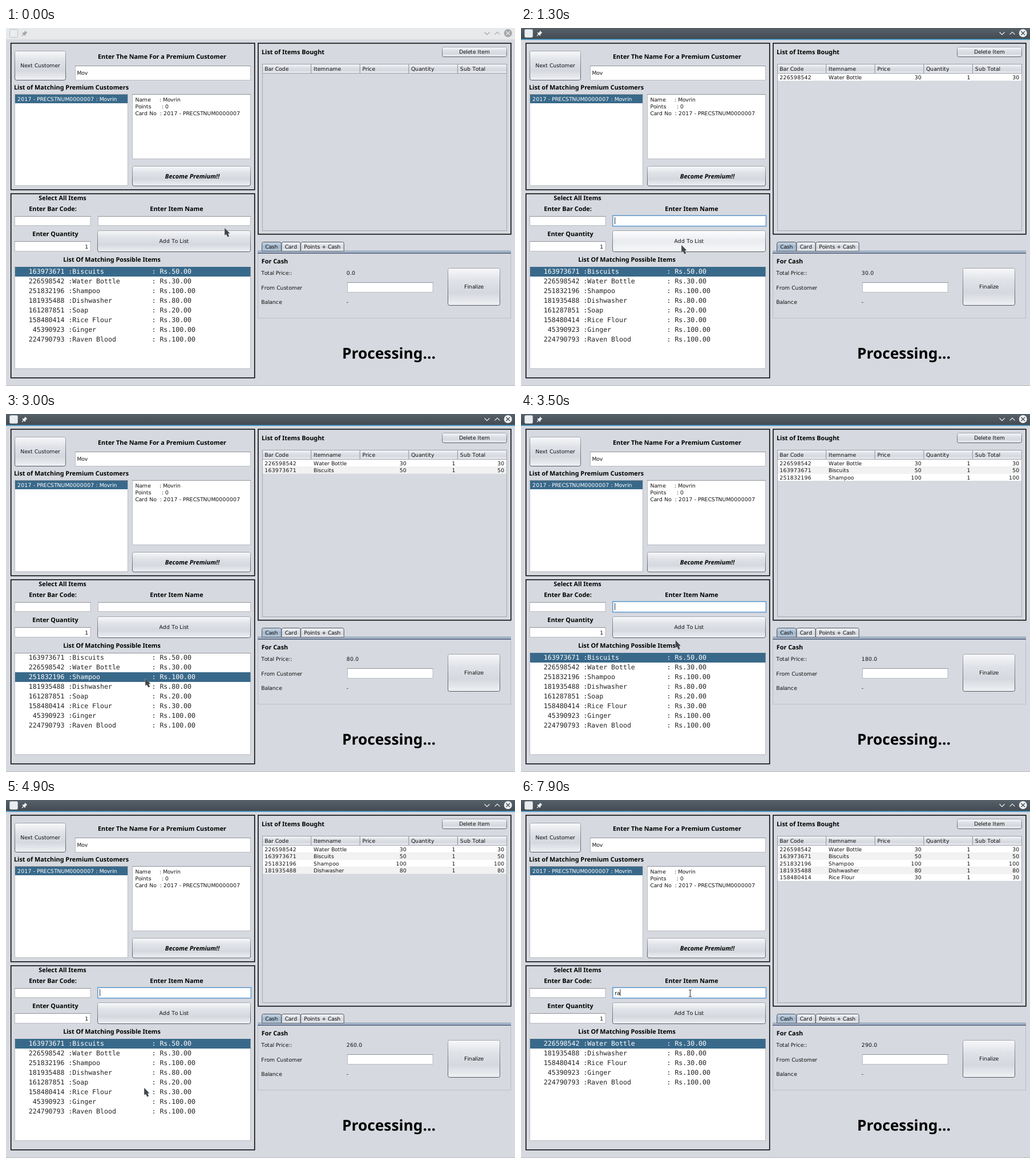
Recreate the animation shown at these times as an HTML page. Size 892 by 628 pixels, loop 8000 ms.

```html
<!DOCTYPE html>
<html lang="en">
<head>
<meta charset="utf-8">
<title>Billing window</title>
<style>
  html, body { margin: 0; width: 100%; height: 100%; overflow: hidden; background: #d6d9df; }
  svg { display: block; width: 892px; height: 628px; }
  text { white-space: pre; text-rendering: geometricPrecision; }
  .bold { font-family: "Noto Sans", "Open Sans", sans-serif; font-weight: 700; font-size: 10.85px; text-anchor: middle; }
</style>
</head>
<body>
<svg id="stage" viewBox="0 0 892 628" xmlns="http://www.w3.org/2000/svg">
  <defs id="defs"></defs>
  <g id="base"></g>
  <g id="live"></g>
</svg>
<script>
const LOOP = 8000, STEP = 100;
const K = 0.773;               // interface scale
const SHORT = 'Mov', FULL = 'Movrin', CARD = '2017 - PRECSTNUM0000007';
const items = [
  ['163973671', 'Biscuits', 50], ['226598542', 'Water Bottle', 30],
  ['251832196', 'Shampoo', 100], ['181935488', 'Dishwasher', 80],
  ['161287851', 'Soap', 20], ['158480414', 'Rice Flour', 30],
  ['45390923', 'Ginger', 100], ['224790793', 'Raven Blood', 100]
];

// Each purchase: reach the row at (x, y), pick it, then add it with the button.
const buys = [
  { item: 1, x: 262, y: 452, reach: 400, pick: 600, add: 900 },
  { item: 0, x: 258, y: 432, reach: 1400, pick: 1800, add: 2300 },
  { item: 2, x: 244, y: 464, reach: 2600, pick: 2900, add: 3400 },
  { item: 3, x: 229, y: 478, reach: 3600, pick: 4000, add: 4700 },
  { item: 5, x: 242, y: 505, reach: 4900, pick: 5200, add: 5500 }
];
const START = [383, 351], ADD = [294, 352], LEAVE = [282, 389];
const FIELD_AT = 6000, TYPE_AT = 7500, FILTER_AT = 7700, TYPE_GAP = 400;
const moves = buys.flatMap(b => [
  { at: b.reach - 250, span: 250, to: [b.x, b.y] },
  { at: b.pick + 100, span: 200, to: ADD }
]).concat({ at: FIELD_AT - 350, span: 250, to: LEAVE });

const byId = id => document.getElementById(id);
const pen = document.createElement('canvas').getContext('2d');

// The toolkit sets text on whole-pixel advances before scaling.
function advances(s, size, face) {
  pen.font = `${size}px "${face}", sans-serif`;
  const at = [0];
  for (const c of s) at.push(at[at.length - 1] + Math.round(pen.measureText(c).width) * K);
  return at;
}
function label(s, x, y, { align = 0, fill = '#111', size = 12, face = 'DejaVu Sans' } = {}) {
  const at = advances(s, size, face);
  const left = x - align * at.pop();
  const generic = face.endsWith('Mono') ? 'monospace' : 'sans-serif';
  return `<text x="${at.map(a => (left + a).toFixed(2)).join(' ')}" y="${y}" fill="${fill}"
    font-size="${size * K}" font-family="'${face}', ${generic}">${s}</text>`;
}
const mid = { align: 0.5 }, right = { align: 1 };
const bold = (s, x, y, extra = '') => `<text class="bold" x="${x}" y="${y}" fill="#000" ${extra}>${s}</text>`;
const rect = (x, y, w, h, fill, extra = '') =>
  `<rect x="${x}" y="${y}" width="${w}" height="${h}" fill="${fill}" ${extra}/>`;
const line = (d, color, w = 1) => `<path d="${d}" fill="none" stroke="${color}" stroke-width="${w}"/>`;
const panel = (x, y, w, h) => rect(x, y, w, h, 'none', `stroke="#050506" stroke-width="${2 * K}"`);
const button = (x, y, w, h, fill = 'btn') =>
  rect(x + .5, y + .5, w - 1, h - 1, `url(#${fill})`, 'rx="3" stroke="url(#edge)"');
const textButton = (s, x, y, w, h, fill) => button(x, y, w, h, fill) + label(s, x + w / 2, y + h / 2 + 3.4, mid);
const field = (x, y, w, h) =>
  rect(x + .5, y + .5, w - 1, h - 1, '#fff', 'stroke="#b9bcc1"') + line(`M${x} ${y + .5}h${w}`, '#8f9399');

// Vertical gradient with evenly spaced colours.
function gradient(id, ...colors) {
  const stops = colors.map((c, i) => `<stop offset="${i / (colors.length - 1)}" stop-color="${c}"/>`);
  return `<linearGradient id="${id}" x2="0" y2="1">${stops.join('')}</linearGradient>`;
}

function drawBase() {
  let s = rect(0, 0, 892, 628, '#d6d9df') + rect(0, 627, 892, 1, '#b9bcc1');
  s += panel(8.7, 26.7, 427, 257) + panel(8.7, 290.7, 427, 323) + panel(441.9, 26.7, 443, 335);

  s += textButton('Next Customer', 15, 40, 90, 52);
  s += bold('Enter The Name For a Premium Customer', 273.5, 53.5);
  s += field(121, 66, 308, 26) + label(SHORT, 124.5, 82);
  s += bold('List of Matching Premium Customers', 114.5, 107.5);
  s += field(15, 116, 199, 161) + rect(16, 117, 197, 15, '#39698a');
  s += label(`${CARD} : ${FULL}`, 20, 128.3, { fill: '#fff' });
  s += field(221, 116, 208, 114);
  [`Name     : ${FULL}`, 'Points      : 0', `Card No  : ${CARD}`]
    .forEach((row, i) => { s += label(row, 226.5, 129.4 + i * 15 * K); });
  s += button(221, 242, 208, 35.5) + bold('Become Premium!!', 326.5, 263.7, 'font-style="italic"');

  s += bold('Select All Items', 99, 302.3) + bold('Enter Bar Code:', 82, 320.8);
  s += bold('Enter Item Name', 299, 320.8) + bold('Enter Quantity', 86.5, 364.8);
  s += field(15, 330, 133.5, 17) + field(15, 374, 133.5, 18) + label('1', 144.5, 386.5, right);
  s += bold('List Of Matching Possible Items', 185.5, 410.3) + field(15, 419, 414, 179);

  s += bold('List of Items Bought', 503, 45.5) + textButton('Delete Item', 764, 33, 114, 18);
  s += rect(449.5, 63.5, 428, 292, 'none', 'stroke="#a5a9b0"');
  s += rect(449.5, 63.5, 428, 16, 'url(#btn)', 'stroke="#9a9ea6"');
  ['Bar Code', 'Itemname', 'Price', 'Quantity', 'Sub Total'].forEach((name, i) => {
    s += label(name, 453.3 + i * 85.6, 75);
    if (i) s += line(`M${449 + i * 85.6} 64v15`, '#8d9199');
  });

  s += rect(441.5, 395, 443, 114, '#d6d9df', 'stroke="#bbbfc6"');
  s += rect(441, 391, 444, 4, '#b7c6d6') + line('M441 391.3h444', '#6e8aa6') + line('M441 394.8h444', '#2b3a5e', 1.3);
  let x = 448.5;
  for (const name of ['Cash', 'Card', 'Points + Cash']) {
    const w = advances(name, 12, 'DejaVu Sans').pop() + 11.5;
    s += `<path d="M${x} 391.5v-13q0-3 3-3h${w - 6}q3 0 3 3v13z" fill="url(#${name === 'Cash' ? 'tab' : 'btn'})" stroke="#4b5563"/>`;
    s += label(name, x + w / 2, 387.2, mid);
    x += w + .5;
  }
  s += bold('For Cash', 471, 412.5);
  ['Total Price::', 'From Customer', 'Balance'].forEach((name, i) => { s += label(name, 447.3, 433.3 + i * 25.4); });
  s += label('-', 596.7, 484.3) + field(598, 446, 150.5, 18) + textButton('Finalize', 774, 421, 92, 66);
  return s + bold('Processing...', 671, 580, 'style="font-size:26.3px"');
}

function titleBar(focus) {
  const ink = focus > .5 ? '#eef0f1' : '#a3a7aa';
  const cross = focus > .5 ? '#454d54' : '#e4e5e6';
  let s = rect(0, 0, 892, 20, '#e8e9ea');
  s += `<g opacity="${focus}">${rect(0, 0, 892, 20, 'url(#bar)')}${rect(0, 19.3, 892, 1.5, '#3d9fd0')}</g>`;
  s += rect(6.5, 2.5, 14, 14, '#e9edf0', 'rx="2" stroke="#b9c0c6"');
  s += `<path d="M33.2 4.6l4 4-1.2.6-2 2 .2 1.8-1 .8-4.8-4.8.8-1 1.8.2 2-2z" fill="${ink}"/>` + line('M31 11l-3 3', ink, 1.2);
  s += line('M838.5 7.2l4.5 4.4 4.5-4.4M856.5 11.4l4.5-4.4 4.5 4.4', ink, 1.2);
  s += `<circle cx="879.7" cy="9" r="7" fill="${ink}"/>` + line('M876.4 5.7l6.6 6.6m0-6.6l-6.6 6.6', cross, 1.3);
  return s;
}

// The pointer gathers speed along each move and stops at its end.
function pointerAt(t) {
  return moves.filter(m => t > m.at).reduce((pos, m) => {
    const p = Math.min(1, (t - m.at) / m.span);
    return pos.map((v, i) => v + (m.to[i] - v) * p * p);
  }, START);
}

function pointer(t, [x, y]) {
  if (t >= FIELD_AT) {
    const cy = t < FIELD_AT + 100 ? 332 : 339;
    return line(`M294 ${cy - 6}q2.5 0 2.5 1.5v9q0 1.5-2.5 1.5m5-12q-2.5 0-2.5 1.5v9q0 1.5 2.5 1.5`, '#3c3f42', 1.1);
  }
  return `<path transform="translate(${x} ${y})" d="M.2 0v12.6l2.7-1.8 2.5 4.8 2.7-1.4-2.2-4.4 3.3-.6z"
    fill="#43474b" stroke="#d9dbde" stroke-width=".8" paint-order="stroke"/>`;
}

function itemList(filter, sel) {
  return items.filter(i => i[1].toLowerCase().includes(filter)).map(([code, name, price], i) => {
    const y = 419 + i * 22 * K;
    const on = i === sel;
    const row = `${code.padStart(9)} :${name.padEnd(20)}: Rs.${price}.00`;
    return (on ? rect(16, y, 412.5, 17, '#39698a') : '') +
      label(row, 39.8, y + 12.3, { size: 15, face: 'DejaVu Sans Mono', fill: on ? '#fff' : '#222' });
  }).join('');
}

function bill(rows) {
  return rows.map(([code, name, price], i) => {
    const top = 80 + i * 16 * K, y = top + 9.9;
    return rect(450, top, 427, 16 * K, i % 2 ? '#f2f2f2' : '#fff') +
      label(code, 453.3, y) + label(name, 539, y) + label(`${price}`, 702, y, right) +
      label('1', 787.7, y, right) + label(`${price}`, 873.5, y, right);
  }).join('');
}

function itemField(typed, since) {
  let s = rect(160.8, 329, 268.6, 18.6, '#fff', 'stroke="#73a4d1" stroke-width="1.8"');
  s += label(typed, 164.2, 341.8);
  const caret = 164.6 + advances(typed, 12, 'DejaVu Sans').pop();
  if (since % 1000 < 500 || typed) s += line(`M${caret} 332v12`, '#111', .9);
  return s;
}

function draw(t) {
  const bought = buys.filter(b => b.add <= t);
  const picked = buys.find(b => b.pick <= t && t < b.add);
  const rows = bought.map(b => items[b.item]);
  const total = rows.reduce((sum, r) => sum + r[2], 0);
  const typed = 'ra'.slice(0, Math.max(0, Math.floor((t - TYPE_AT) / TYPE_GAP) + 1));
  const pos = pointerAt(t), [px, py] = pos;
  const over = t < FIELD_AT && px > 160 && px < 429 && py > 355 && py < 386;
  const down = picked && t >= picked.add - 100;
  const last = bought[bought.length - 1];

  byId('live').innerHTML = [
    titleBar(Math.min(1, Math.max(0, (t - buys[0].pick + 100) / 200))),
    last && !picked ? itemField(typed, t - last.add) : field(161, 330, 268, 17),
    textButton('Add To List', 160, 355, 269, 38, down ? 'press' : over ? 'hover' : 'btn'),
    itemList(t >= FILTER_AT ? 'r' : '', picked ? picked.item : 0),
    bill(rows),
    label(total.toFixed(1), 596.7, 433.3),
    pointer(t, pos)
  ].join('');
}

byId('defs').innerHTML = gradient('btn', '#f8f8fa', '#dfe2e7', '#d5d8de', '#eff1f4') +
  gradient('hover', '#fdfdfe', '#e9ebef', '#f8f9fb') + gradient('press', '#a5b5c6', '#8da0b5', '#b9c7d6') +
  gradient('edge', '#a2a6ad', '#565a61') + gradient('tab', '#c9d6e4', '#a3b8cd', '#b4c6d8') +
  gradient('bar', '#57616a', '#424a51');
byId('base').innerHTML = drawBase();

let shown = -1;
function tick() {
  const t = Math.floor(performance.now() % LOOP / STEP) * STEP;
  if (t !== shown) draw(shown = t);
  requestAnimationFrame(tick);
}
tick();
</script>
</body>
</html>
```
